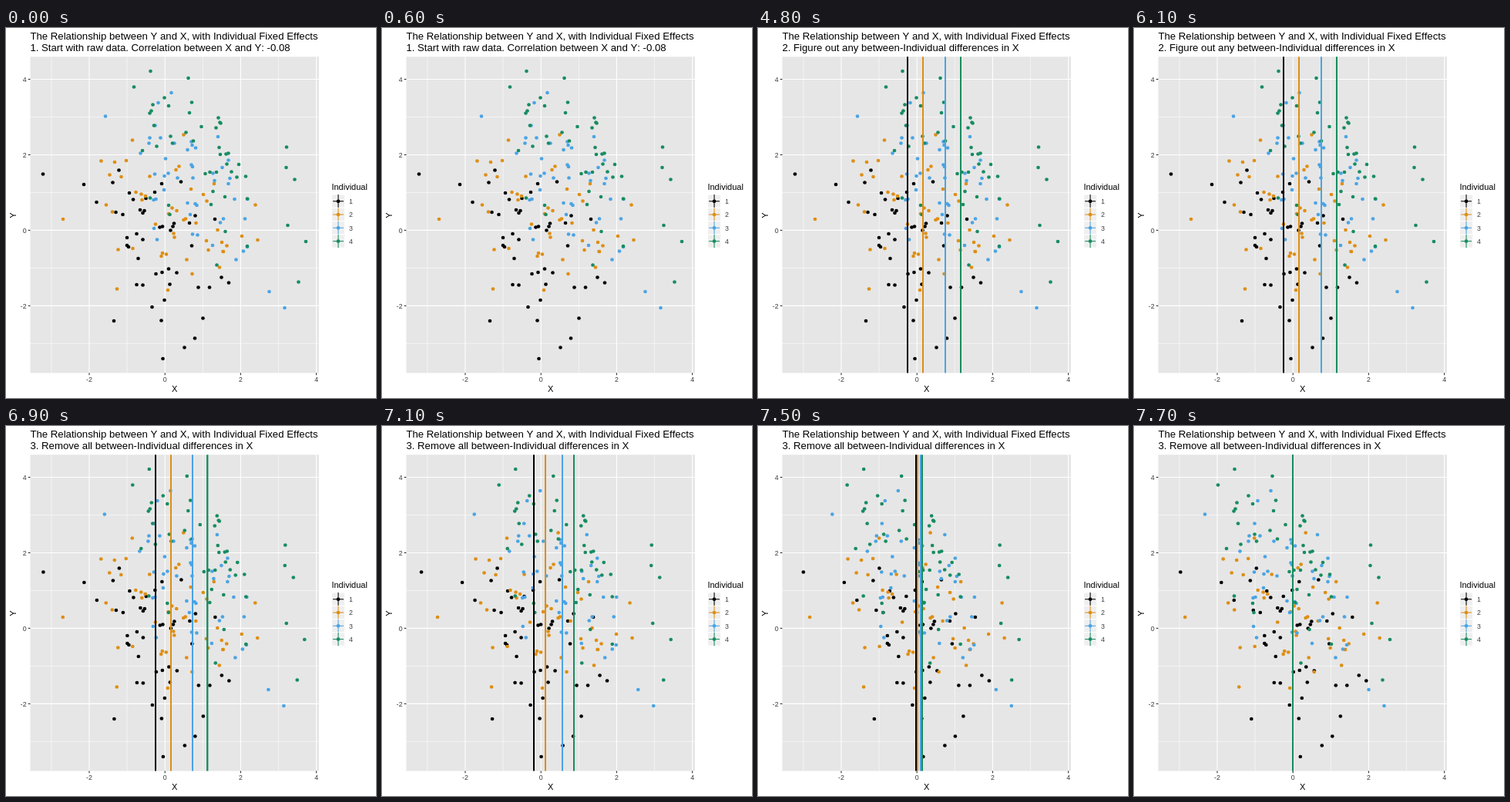
An HTML page with a canvas for the animation above (8000 ms loop, 480 by 480 pixels).

```html
<!DOCTYPE html>
<html lang="en">
<head>
<meta charset="utf-8">
<title>Individual fixed effects</title>
<style>
html, body { margin: 0; width: 100%; height: 100%; overflow: hidden; background: #fff; }
canvas, svg { position: absolute; left: 0; top: 0; width: 480px; height: 480px; }
text { font-family: "Liberation Sans", Arial, sans-serif; font-kerning: none; white-space: pre; }
.title { font-size: 13.2px; }
.label { font-size: 11px; }
.tick { font-size: 8.8px; fill: #3c3c3c; }
.mid { text-anchor: middle; }
.end { text-anchor: end; }
</style>
</head>
<body>
<canvas id="plot" width="480" height="480"></canvas>
<svg id="labels" viewBox="0 0 480 480">
  <text class="title" x="31.4" y="15.2">The Relationship between Y and X, with Individual Fixed Effects</text>
  <text class="title" x="31.4" y="29.6" id="step"></text>
  <text class="label mid" x="218.7" y="472">X</text>
  <text class="label mid" transform="translate(13 243) rotate(-90)">Y</text>
  <text class="label" x="422.4" y="210.3">Individual</text>
</svg>
<script>
const LOOP = 8000, TICK = 100;
const PANEL = { l: 31.5, t: 37.3, r: 406, b: 447.5 };
const X0 = 206.2, Y0 = 262.4, UX = 49.1, UY = 48.97;
const STEPS = [
  '1. Start with raw data. Correlation between X and Y: -0.08',
  '2. Figure out any between-Individual differences in X',
  '3. Remove all between-Individual differences in X'
];

// One series per individual: colour, mean of X and the scatter as x, y pairs on the stage.
const groups = [
  { color: '#000000', mean: 193.9, pts: [
    48,189.5, 101,203, 117.5,226, 138.5,200.5, 146.5,184.5, 142.5,239, 151.5,242, 160,214,
    165,222.5, 174,236, 179.5,237, 177.5,240, 181.5,221, 193,213, 202,202, 227,199.5,
    199.5,258.5, 203,257.5, 218,253.5, 216.5,257.5, 213.5,262.5, 238,253, 245.5,243.5, 271,248,
    157,272, 169.5,267, 177.5,274.5, 157,282, 159,284, 171.5,299, 241,282.5, 169.5,333,
    177.5,333.5, 189.5,362, 205.5,353, 201.5,379.5, 140,380, 194.5,319, 202.5,317, 211,312.5,
    221.5,317.5, 212.5,332.5, 249.5,336.5, 264,336.5, 279.5,323.5, 289,330.5, 255.5,376.5,
    245,402.5, 231.5,414.5, 203.5,429] },
  { color: '#de8e14', mean: 214, pts: [
    74,248, 123.5,172.5, 141,174, 156,172, 164,145.5, 134.5,190.5, 149.5,193, 130,229.5,
    138,238.5, 168.5,213, 175.5,215.5, 181,218, 176.5,223, 186.5,192.5, 230.5,138.5, 224.5,179.5,
    220.5,184, 240,209, 256,216, 260.5,224.5, 270,202, 215.5,233.5, 221.5,237, 194,254.5,
    233,247.5, 230.5,249, 246.5,253, 323.5,229.5, 326.5,275, 306,270, 274.5,262, 260,276,
    262.5,288, 280,278, 286.5,282.5, 281.5,290, 282,290, 277,310.5, 217.5,266.5, 218.5,271.5,
    203,292, 208,293.5, 201.5,296, 234.5,300.5, 241.5,319, 210,340, 144,338.5, 145.5,287.5,
    164.5,286, 211,241] },
  { color: '#4aa4e4', mean: 243.2, pts: [
    129,114.5, 214.5,84, 197.5,97, 193.5,126.5, 186.5,142.5, 200.5,142.5, 185.5,149.5, 174.5,162.5,
    207,169.5, 193,189.5, 210.5,188.5, 205.5,192, 222.5,194.5, 218.5,149.5, 240.5,147.5, 241.5,152,
    246,155.5, 235.5,158, 275,141, 288.5,171.5, 280.5,181, 240.5,177.5, 242,180, 242.5,194.5,
    268.5,188.5, 270.5,198, 290.5,195, 288.5,202, 296.5,222, 313.5,222, 205,210, 194.5,222,
    191.5,223, 235.5,227, 245.5,228, 247.5,230, 239,242, 282,247.5, 278,252.5, 310,247.5,
    192,260, 196,274.5, 242,267.5, 248.5,268.5, 268,282, 313,284, 308,289.5, 298.5,300.5,
    341.5,342, 361.5,363] },
  { color: '#178c60', mean: 263.2, pts: [
    187.5,56, 236.5,65, 166,76.5, 205.5,90.5, 190.5,99.5, 211,101, 241,96.5, 186.5,110.5,
    188.5,107.5, 238,110, 192,126.5, 195.5,153.5, 177,159, 213.5,140.5, 216,149.5, 233.5,135.5,
    253.5,128, 243,146.5, 275.5,116.5, 272.5,129.5, 277.5,122.5, 278.5,123.5, 276.5,155, 278,164,
    285.5,163.5, 288.5,162.5, 286.5,176.5, 302,177, 292.5,186.5, 299.5,193.5, 311,192.5, 258.5,189,
    264.5,187, 273,187, 268.5,212, 284,219, 313,221.5, 266,229, 284.5,264, 313,283,
    273.5,307.5, 364,154.5, 363.5,181, 374.5,196.5, 365.5,256, 389,277, 379.5,329.5, 187,220.5,
    211,230, 212.5,242] }
];

const ctx = document.getElementById('plot').getContext('2d');
const labels = document.getElementById('labels');
const stepText = document.getElementById('step');
const sx = v => X0 + v * UX;
const sy = v => Y0 - v * UY;

function addText(str, x, y, cls) {
  const el = document.createElementNS(labels.namespaceURI, 'text');
  el.setAttribute('x', x);
  el.setAttribute('y', y);
  el.setAttribute('class', cls);
  el.textContent = str;
  labels.appendChild(el);
}

function line(x1, y1, x2, y2, color, width) {
  ctx.strokeStyle = color;
  ctx.lineWidth = width;
  ctx.beginPath();
  ctx.moveTo(x1, y1);
  ctx.lineTo(x2, y2);
  ctx.stroke();
}

function dot(x, y, color) {
  ctx.fillStyle = color;
  ctx.beginPath();
  ctx.arc(x, y, 2.35, 0, Math.PI * 2);
  ctx.fill();
}

// Fifty thin lines on one spot: partly covered pixel columns turn nearly solid.
function meanLine(x, color) {
  const a = x - 0.53, b = x + 0.53;
  ctx.fillStyle = color;
  for (let c = Math.floor(a); c < b; c++) {
    const cover = Math.min(b, c + 1) - Math.max(a, c);
    ctx.globalAlpha = 1 - (1 - Math.min(1, cover)) ** 50;
    ctx.fillRect(c, PANEL.t, 1, PANEL.b - PANEL.t);
  }
  ctx.globalAlpha = 1;
}

function drawPanel() {
  const { l, t, r, b } = PANEL;
  ctx.fillStyle = '#fff';
  ctx.fillRect(0, 0, 480, 480);
  ctx.fillStyle = '#e6e6e6';
  ctx.fillRect(l, t, r - l, b - t);
  for (let v = -3; v <= 4; v++) {
    const major = v % 2 === 0, w = major ? 1.07 : 0.53;
    line(sx(v), t, sx(v), b, '#fff', w);
    line(l, sy(v), r, sy(v), '#fff', w);
    if (major) {
      line(sx(v), b, sx(v), b + 2.75, '#262626', 1.07);
      line(l - 2.75, sy(v), l, sy(v), '#262626', 1.07);
    }
  }
}

function drawLegend() {
  const x = 422.4, size = 17.28;
  groups.forEach((g, i) => {
    const y = 216.1 + i * size, cx = x + size / 2, cy = y + size / 2;
    ctx.fillStyle = '#efefef';
    ctx.fillRect(x, y, size, size);
    ctx.strokeStyle = '#fff';
    ctx.lineWidth = 1.07;
    ctx.strokeRect(x, y, size, size);
    line(cx, y, cx, y + size, g.color, 1.07);
    line(x + size * 0.1, cy, x + size * 0.9, cy, g.color, 1.07);
    dot(cx, cy, g.color);
  });
}

function draw(tick) {
  const p = Math.min(1, Math.max(0, (tick - 68) / 9));
  const ease = (1 - Math.cos(Math.PI * p)) / 2;
  const shift = g => (X0 - g.mean) * ease;

  drawPanel();
  for (const g of groups) {
    for (let i = 0; i < g.pts.length; i += 2) dot(g.pts[i] + shift(g), g.pts[i + 1], g.color);
  }
  if (tick >= 42) groups.forEach(g => meanLine(g.mean + shift(g), g.color));
  drawLegend();
  stepText.textContent = STEPS[tick < 39 ? 0 : tick < 69 ? 1 : 2];
}

for (let v = -2; v <= 4; v += 2) {
  addText(v, sx(v), 459, 'tick mid');
  addText(v, 26.6, sy(v) + 3.2, 'tick end');
}
groups.forEach((g, i) => addText(i + 1, 445, 228 + i * 17.28, 'tick'));

const start = performance.now();
let shown = -1;
function loop() {
  const tick = Math.floor(((performance.now() - start) % LOOP) / TICK);
  if (tick !== shown) draw(shown = tick);
  requestAnimationFrame(loop);
}
loop();
</script>
</body>
</html>
```
